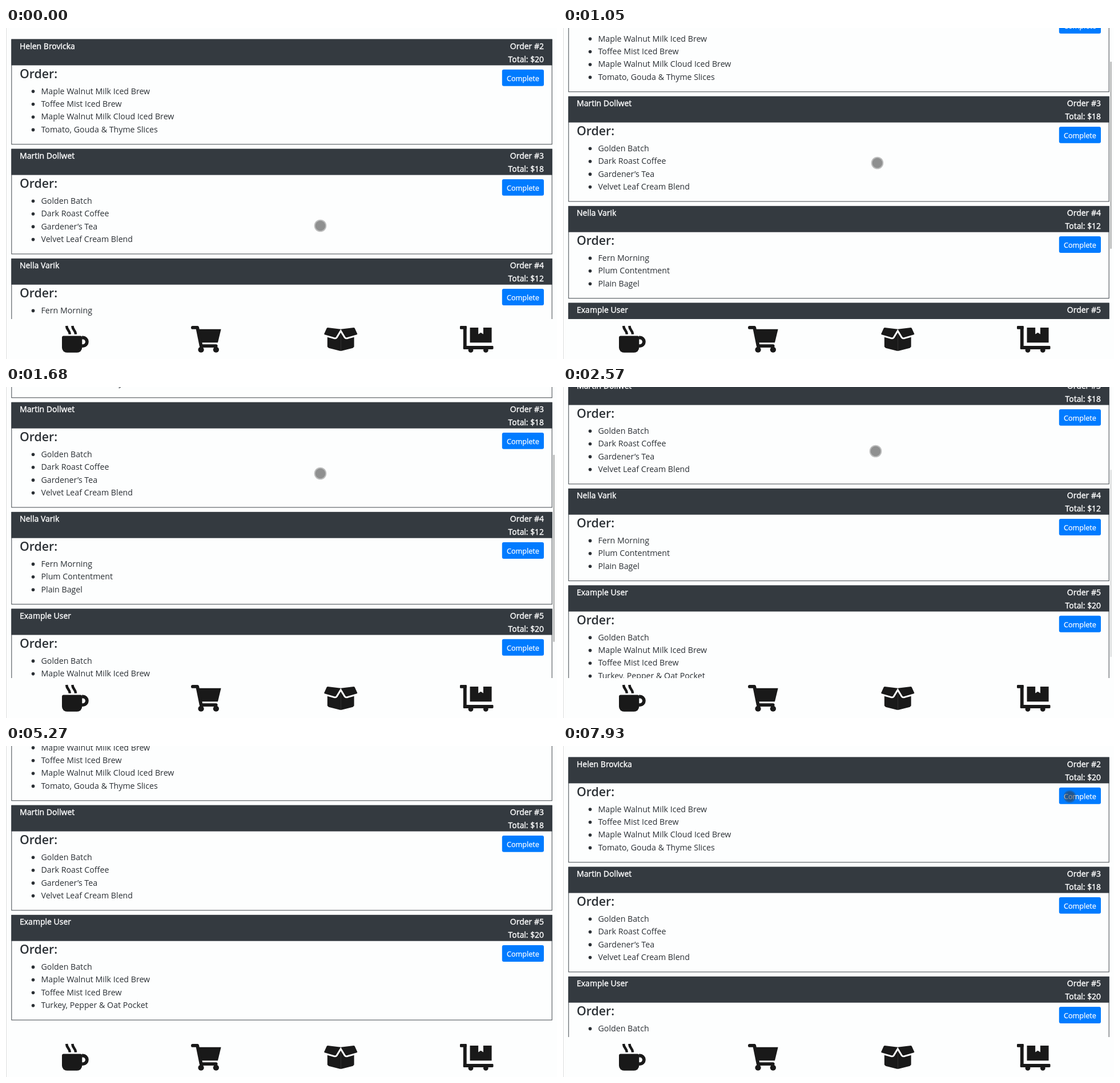
These frames come from a looping animation (965x580 px, 8000 ms). An HTML page with a canvas:

```html
<!DOCTYPE html>
<html lang="en">
<head>
<meta charset="utf-8">
<title>Orders</title>
<style>
  html, body { margin: 0; width: 965px; height: 580px; overflow: hidden; background: #fdfefe; }
  canvas { display: block; }
</style>
</head>
<body>
<canvas id="stage" width="965" height="580"></canvas>
<script>
const ctx = document.getElementById('stage').getContext('2d');
const LOOP = 8000, FIRST_TICK = 497, TICK = 129;
const VIEW = 510, LEFT = 9.35, RIGHT = 956.65, LINE = 22.44;
const PAPER = '#fdfefe', DARK = '#343a40', INK = '#2b3035';
const FONT = '"Open Sans", "Noto Sans", sans-serif';
const PRESS = 29, RELEASE = 30, REMOVAL = 33;

const MAPLE = 'Maple Walnut Milk Iced Brew', TOFFEE = 'Toffee Mist Iced Brew', GOLDEN = 'Golden Batch';
const orders = [
  { id: 2, name: 'Helen Brovicka', total: 20,
    items: [MAPLE, TOFFEE, 'Maple Walnut Milk Cloud Iced Brew', 'Tomato, Gouda & Thyme Slices'] },
  { id: 3, name: 'Martin Dollwet', total: 18,
    items: [GOLDEN, 'Dark Roast Coffee', 'Gardener’s Tea', 'Velvet Leaf Cream Blend'] },
  { id: 4, name: 'Nella Varik', total: 12,
    items: ['Fern Morning', 'Plum Contentment', 'Plain Bagel'] },
  { id: 5, name: 'Example User', total: 20,
    items: [GOLDEN, MAPLE, TOFFEE, 'Turkey, Pepper & Oat Pocket'] },
];

// Key points are [tick, ...values], joined by straight moves.
const scrollKeys = [[-1, 0], [1, 15], [4, 92], [9, 185], [13, 226], [32, 226], [33, 108], [41, 108], [44, 29], [47, 0]];
const gestures = [
  { until: 20, keys: [[-1, 550, 346], [4, 550, 236], [9, 550, 151], [13, 547, 112], [17, 547, 112], [19, 660, 179]] },
  { until: 37, keys: [[21, 837, 257], [23, 874, 238], [25, 901, 247], [34, 901, 247], [36, 801, 217]] },
  { until: 51, keys: [[38, 621, 142], [40, 570, 63], [41, 570, 63], [44, 589, 151], [47, 594, 204], [49, 594, 204], [50, 616, 190]] },
  { until: 54, keys: [[53, 759, 138]] },
  { until: 99, keys: [[55, 852, 102], [57, 887, 88]] },
];

function along(keys, tick) {
  const next = keys.findIndex(key => key[0] > tick);
  if (next === 0) return keys[0].slice(1);
  if (next < 0) return keys.at(-1).slice(1);
  const a = keys[next - 1], b = keys[next];
  const k = (tick - a[0]) / (b[0] - a[0]);
  return a.slice(1).map((v, i) => v + (b[i + 1] - v) * k);
}

function barOpacity(tick) {
  if (tick === 16 || tick === 48) return .45;
  return tick >= 0 && tick < 16 || tick >= 42 && tick < 48 ? 1 : 0;
}

function text(str, x, y, size, color, { align = 'left', weight = 400, bolder = 0 } = {}) {
  ctx.font = `${weight} ${size}px ${FONT}`;
  ctx.fillStyle = ctx.strokeStyle = color;
  ctx.textAlign = align;
  ctx.fillText(str, x, y);
  if (bolder) {
    ctx.lineWidth = bolder;
    ctx.strokeText(str, x, y);
  }
}

function roundRect(x, y, w, h, r, color) {
  ctx.fillStyle = color;
  ctx.beginPath();
  ctx.roundRect(x, y, w, h, r);
  ctx.fill();
}

function disc(x, y, r, color) {
  ctx.fillStyle = color;
  ctx.beginPath();
  ctx.arc(x, y, r, 0, 7);
  ctx.fill();
}

const BLACK = '#191919';
const shape = d => ctx.fill(new Path2D(d));
function line(d, width, cap = 'butt') {
  ctx.lineWidth = width;
  ctx.lineCap = ctx.lineJoin = cap === 'butt' ? 'miter' : cap;
  ctx.lineCap = cap;
  ctx.stroke(new Path2D(d));
}

// Icons are drawn on a grid 512 units high.
function mug() {
  roundRect(0, 192, 386, 320, [32, 32, 96, 96], BLACK);
  line('M384 224H400A80 80 0 0 1 400 384H384', 64);
  for (const x of [88, 200]) line(`M${x} 0C${x + 6} 85 ${x + 58} 75 ${x + 64} 160`, 50);
}

function cart() {
  shape('M150 64H576L514 320H190Z');
  line('M32 32H122L194 384H478', 64, 'round');
  for (const x of [192, 480]) disc(x, 456, 56, BLACK);
}

function box() {
  for (const side of [1, -1]) {
    ctx.save();
    ctx.translate(320, 0);
    ctx.scale(side, 1);
    shape('M0 64L-250 32 -267 41 -319 155 -308 167 -110 223 -92 216Z');
    shape('M1 126L-64 233 -88 253 -119 254 -256 215V400L-232 424 -16 478 1 480Z');
    ctx.restore();
  }
}

function trolley() {
  shape('M192 32H352V160L400 128 448 160V32H608V320H192Z');
  roundRect(0, 0, 128, 64, 16, BLACK);
  roundRect(64, 0, 64, 448, 16, BLACK);
  roundRect(64, 384, 576, 64, 16, BLACK);
  for (const x of [208, 496]) disc(x, 464, 48, BLACK);
}

function drawIcon(icon, x) {
  ctx.save();
  ctx.translate(x, 522);
  ctx.scale(.0914, .0914);
  ctx.fillStyle = ctx.strokeStyle = BLACK;
  icon();
  ctx.restore();
}

function drawButton(y, color, focused) {
  if (focused) roundRect(866, y - 3, 79, 35, 6, '#80bdff');
  roundRect(868.8, y, 73.2, 28.9, 3, color);
  text('Complete', 905.4, y + 19.7, 12.65, '#fff', { align: 'center', bolder: .25 });
}

const cardHeight = order => 94.9 + order.items.length * LINE;

function drawCard(order, y, tick) {
  const onBar = { bolder: .4 }, onBarRight = { bolder: .4, align: 'right' };
  ctx.strokeStyle = DARK;
  ctx.lineWidth = .94;
  ctx.strokeRect(LEFT + .47, y + .47, RIGHT - LEFT - .94, cardHeight(order) - .94);
  ctx.fillStyle = DARK;
  ctx.fillRect(LEFT, y, RIGHT - LEFT, 45.8);
  text(order.name, 24, y + 17.4, 14, '#fff', onBar);
  text('Order #' + order.id, 942, y + 17.4, 14, '#fff', onBarRight);
  text('Total: $' + order.total, 942, y + 39.9, 13.9, '#fff', onBarRight);
  text('Order:', 24, y + 68.2, 21.3, INK, { weight: 600 });
  order.items.forEach((item, i) => {
    const base = y + 95.9 + i * LINE;
    disc(47.5, base - 4.4, 2.8, INK);
    text(item, 61.5, base, 14.2, INK);
  });
  const focused = order.id === 4 && tick >= PRESS;
  const color = !focused ? '#007bff' : tick < RELEASE ? '#0062cc' : '#0069d9';
  drawButton(y + 53.2, color, focused);
}

function drawPointer(tick) {
  const gesture = gestures.find(g => tick < g.until);
  if (tick >= 0 && tick < gesture.keys[0][0]) return;
  const [x, y] = along(gesture.keys, tick);
  ctx.strokeStyle = 'rgba(60,60,60,.33)';
  ctx.lineWidth = 1.8;
  ctx.beginPath();
  ctx.arc(x + .5, y + .5, 9.9, 0, 7);
  ctx.stroke();
  disc(x + .5, y + .5, 9, 'rgba(60,60,60,.57)');
}

function draw(t) {
  const tick = Math.max(-1, Math.floor((t - FIRST_TICK) / TICK));
  const [scroll] = along(scrollKeys, tick);
  ctx.fillStyle = PAPER;
  ctx.fillRect(0, 0, 965, 580);

  ctx.save();
  ctx.beginPath();
  ctx.rect(0, 0, 965, VIEW);
  ctx.clip();
  let top = 19.6;
  for (const order of orders) {
    if (order.id === 4 && tick >= REMOVAL) continue;
    drawCard(order, top - scroll, tick);
    top += cardHeight(order) + 7.5;
  }
  ctx.restore();

  const ratio = VIEW / (top + 28);
  ctx.fillStyle = `rgba(0,0,0,${.26 * barOpacity(tick)})`;
  ctx.fillRect(958, scroll * ratio, 3, VIEW * ratio);
  ctx.fillStyle = '#dcdedd';
  ctx.fillRect(0, 0, 1, 580);

  drawIcon(mug, 98);
  drawIcon(cart, 324);
  drawIcon(box, 557);
  drawIcon(trolley, 795);
  drawPointer(tick);
}

const start = performance.now();
function frame() {
  draw((performance.now() - start) % LOOP);
  requestAnimationFrame(frame);
}
frame();
</script>
</body>
</html>
```
